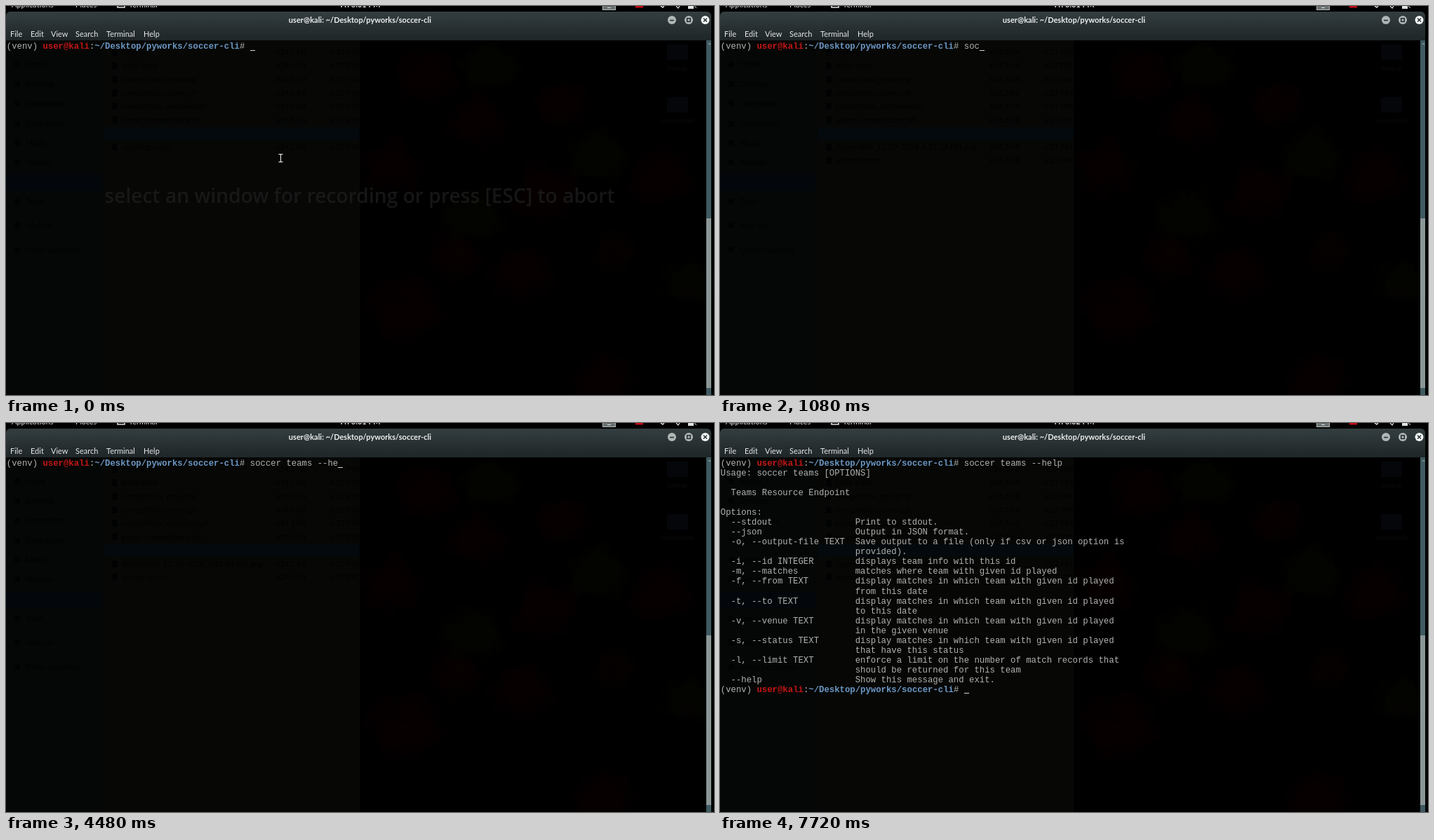
An HTML page with a canvas for the animation above (8 s loop, 1009x555 px).

```html
<!DOCTYPE html>
<html lang="en">
<head>
<meta charset="utf-8">
<title>Terminal</title>
<style>
html, body { margin: 0; width: 100%; height: 100%; overflow: hidden; background: #000; }
canvas { display: block; }
</style>
</head>
<body>
<canvas id="stage" width="1009" height="555"></canvas>
<script>
const LOOP = 8000, W = 1009, H = 555;
const CELL = 7.382, ROW = 14.04, LEFT = 0.8, BASE = 61;
const MONO = '12.3px "Liberation Mono", monospace';
const UI = '11px Lato, sans-serif';
const PLAIN = '#b0b2b0';
const stage = document.getElementById('stage');
const backdrop = document.createElement('canvas');
backdrop.width = W;
backdrop.height = H;
let g = backdrop.getContext('2d');

const command = 'soccer teams --help';
const keyTimes = [800, 920, 1040, 1240, 1400, 1560, 1720, 1840, 1960, 2080,
  2320, 2560, 3080, 3840, 4040, 4280, 4440, 4680, 4960];
const ENTER = 5320, OUTPUT = 5720, MINUTE = 6320;
const prompt = [['(venv) ', PLAIN], ['user@kali', '#c41616', true], [':', PLAIN],
  ['~/Desktop/pyworks/soccer-cli', '#6c97c4', true], ['# ', PLAIN]];
const promptLength = prompt.reduce((n, part) => n + part[0].length, 0);
const help = `Usage: soccer teams [OPTIONS]

  Teams Resource Endpoint

Options:
  --stdout                Print to stdout.
  --json                  Output in JSON format.
  -o, --output-file TEXT  Save output to a file (only if csv or json option is
                          provided).
  -i, --id INTEGER        displays team info with this id
  -m, --matches           matches where team with given id played
  -f, --from TEXT         display matches in which team with given id played
                          from this date
  -t, --to TEXT           display matches in which team with given id played
                          to this date
  -v, --venue TEXT        display matches in which team with given id played
                          in the given venue
  -s, --status TEXT       display matches in which team with given id played
                          that have this status
  -l, --limit TEXT        enforce a limit on the number of match records that
                          should be returned for this team
  --help                  Show this message and exit.`.split('\n');

function rect(x, y, w, h, color) {
  g.fillStyle = color;
  g.fillRect(x, y, w, h);
}

function disc(x, y, r, color) {
  g.fillStyle = color;
  g.beginPath();
  g.arc(x, y, r, 0, 7);
  g.fill();
}

function line(color, width, ...points) {
  g.strokeStyle = color;
  g.lineWidth = width;
  g.beginPath();
  for (const [x, y] of points) g.lineTo(x, y);
  g.stroke();
}

function label(text, x, y, color, font = UI, align = 'left') {
  g.font = font;
  g.fillStyle = color;
  g.textAlign = align;
  g.fillText(text, x, y);
}

function mono(text, col, row, color = PLAIN, bold = false) {
  label(text, LEFT + col * CELL, BASE + row * ROW, color, (bold ? 'bold ' : '') + MONO);
}

function drawPrompt(row) {
  let col = 0;
  for (const [text, color, bold] of prompt) {
    mono(text, col, row, color, bold);
    col += text.length;
  }
}

let seed = 7;
function random() {
  seed = (seed * 16807) % 2147483647;
  return seed / 2147483647;
}

function drawFlower(x, y, r, color) {
  g.fillStyle = color;
  g.globalAlpha = 0.22;
  for (let i = 0; i < 24; i++) {
    const a = i * 2.4, d = r * (0.2 + 0.6 * random());
    g.beginPath();
    g.ellipse(x + d * Math.cos(a), y + d * Math.sin(a) * 0.85, r * 0.4, r * 0.28, a, 0, 7);
    g.fill();
  }
  g.globalAlpha = 1;
}

function drawDesktop() {
  const red = '#0b0302', olive = '#080603';
  const flowers = [[600, 100, 46, red], [690, 85, 44, olive], [790, 140, 40, red],
    [668, 165, 44, red], [548, 230, 46, red], [765, 262, 50, red], [842, 215, 44, olive],
    [935, 245, 48, red], [668, 300, 48, olive], [735, 380, 46, red], [640, 358, 40, red],
    [868, 350, 32, red], [570, 435, 56, red], [972, 395, 42, olive], [850, 535, 46, red]];
  for (const flower of flowers) drawFlower(...flower);
  for (const y of [66, 141]) {
    rect(942, y - 11, 30, 22, '#04060a');
    label(y < 100 ? 'backup' : 'screenshots', 957, y + 26, '#0a0b0b', '9px Lato, sans-serif', 'center');
  }
}

function drawFiles() {
  rect(0, 49, 139, 506, '#050706');
  rect(139, 49, 365, 506, '#070806');
  rect(0, 240, 136, 24, '#03070b');
  rect(139, 173, 365, 18, '#03090c');
  const ink = '#010202';
  const places = [['Home', 83], ['Desktop', 111], ['Documents', 139], ['Downloads', 168],
    ['Music', 195], ['Pictures', 223], ['Trash', 279], ['sda1 vol', 313], ['Other Locations', 348]];
  for (const [name, y] of places) {
    rect(12, y - 4, 8, 8, ink);
    label(name, 28, y + 4, ink);
  }
  const files = ['archive', 'build-tools', 'competition_grouping', 'competition.screen.gif',
    'competition_overview.gif', 'player_competitions.txt'];
  files.forEach((name, i) => drawFile(name, 66 + i * 19.3));
}

function drawFile(name, y) {
  const ink = '#010202';
  rect(151, y - 5, 8, 10, ink);
  label(name, 165, y + 4, ink);
  label('624.5 kB', 384, y + 4, ink);
  label('6:27 PM', 461, y + 4, ink);
}

function drawPanel() {
  const ink = '#dfe2e2';
  label('Applications', 8, 2, ink);
  label('Places', 99, 2, ink);
  label('Terminal', 175, 2, ink);
  line(ink, 1.6, [159, 0], [159, 2], [169, 2], [169, 0]);
  rect(850, 0, 19, 6, '#b4b9b9');
  rect(851, 0, 17, 5, '#6a7172');
  rect(857, 2, 5, 1, '#dfe2e2');
  rect(897, 0, 11, 2.5, '#c50b12');
  line(ink, 1.5, [933, 0], [936, 2], [938, 0]);
  line(ink, 1.2, [955, 0], [958, 3], [960, 0]);
  rect(972, 0, 8, 4, ink);
  line(ink, 1, [981, 0], [984, 3]);
}

function drawFrame() {
  const shade = g.createLinearGradient(0, 8, 0, 49);
  shade.addColorStop(0, '#343e40');
  shade.addColorStop(0.5, '#293133');
  shade.addColorStop(1, '#1f2628');
  g.fillStyle = shade;
  g.beginPath();
  g.roundRect(0, 8, 1005, 41, [6, 6, 0, 0]);
  g.fill();
  label('user@kali: ~/Desktop/pyworks/soccer-cli', 504.5, 23.5, '#eceeee', 'bold ' + UI, 'center');
  const menu = [['File', 6], ['Edit', 35], ['View', 64], ['Search', 99], ['Terminal', 143], ['Help', 196]];
  for (const [name, x] of menu) label(name, x, 44, '#e4e7e7');

  const dark = '#293133';
  disc(949, 20, 6, '#b0b7b7');
  line(dark, 1.6, [946, 20.5], [952, 20.5]);
  disc(973, 20, 6, '#b0b7b7');
  g.strokeRect(970.7, 17.7, 4.6, 4.6);
  disc(996.5, 20, 6, '#f4f6f6');
  line(dark, 1.5, [994, 17.5], [999, 22.5]);
  line(dark, 1.5, [999, 17.5], [994, 22.5]);

  rect(998, 49, 7, 506, '#405a61');
  rect(998, 303, 7, 242, '#8b9797');
  line('#aab4b4', 1, [1001, 55], [1002.5, 53], [1004, 55]);
}

function drawBackdrop() {
  rect(0, 0, W, H, '#000');
  drawDesktop();
  drawFiles();
  drawFrame();
  drawPanel();
}

function drawPointer() {
  for (const [color, extra] of [['#000', 2], ['#e6e6e6', 0]]) {
    const w = 1.2 + extra;
    line(color, w, [391.5, 212], [391.5, 222]);
    line(color, w, [388.5, 211.5], [394.5, 211.5]);
    line(color, w, [388.5, 222.5], [394.5, 222.5]);
  }
}

function drawCursor(t, typed) {
  const keys = [...keyTimes, ENTER].filter(k => k <= t);
  const blinkOff = keys.length && Math.floor((t - keys[keys.length - 1]) / 600) % 2;
  if (blinkOff) return;
  let col = promptLength + typed, row = 0;
  if (t >= OUTPUT) [col, row] = [promptLength, help.length + 1];
  else if (t >= ENTER) [col, row] = [0, 1];
  rect(Math.round(LEFT + col * CELL), Math.round(62.5 + row * ROW), 7, 1, '#d3d7cf');
}

function draw(t) {
  g.drawImage(backdrop, 0, 0);
  label(t < MINUTE ? 'Fri 6:31 PM' : 'Fri 6:32 PM', 505, 2, '#dfe2e2', 'bold ' + UI, 'center');
  if (t < 200) drawFile('standings-read', 201);
  else {
    drawFile('Screenshot_12-29-2018_6:31:54 PM.png', 201);
    drawFile('soccer-teams', 220);
  }
  const fade = Math.max(0, 1 - t / 840);
  label('select an window for recording or press [ESC] to abort', 504, 281,
    `rgba(30,30,30,${0.75 * fade})`, '600 28.2px "Open Sans", sans-serif', 'center');

  const typed = keyTimes.filter(k => k <= t).length;
  drawPrompt(0);
  mono(command.slice(0, typed), promptLength, 0);
  if (t >= OUTPUT) {
    help.forEach((text, i) => mono(text, 0, i + 1));
    drawPrompt(help.length + 1);
  }
  drawCursor(t, typed);
  if (!typed) drawPointer();
}

drawBackdrop();
g = stage.getContext('2d');
const start = performance.now();
function tick() {
  draw((performance.now() - start) % LOOP);
  requestAnimationFrame(tick);
}
tick();
</script>
</body>
</html>
```
